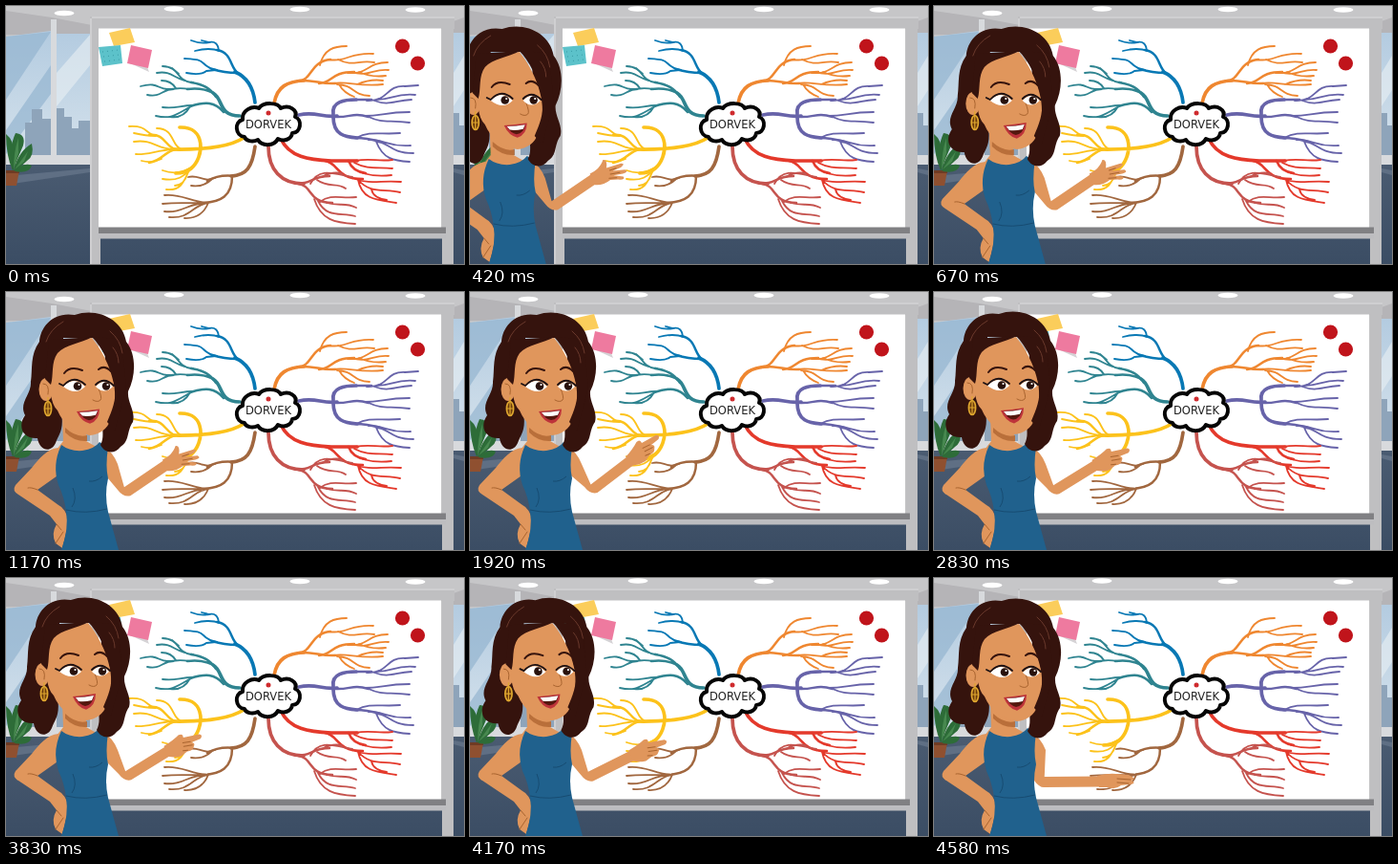
An HTML page that plays this animation: 480 px wide and 270 px high, repeating every 4660 ms.

```html
<!DOCTYPE html>
<html lang="en">
<head>
<meta charset="utf-8">
<title>Mind map presentation</title>
<style>
html, body { margin: 0; width: 100%; height: 100%; overflow: hidden; background: #c4c4c6; }
svg { display: block; width: 100vw; height: 100vh; }
.map path { fill: none; stroke-linecap: round; stroke-linejoin: round; stroke-width: 1.8; }
.map .trunk { stroke-width: 3.7; }
.map .limb { stroke-width: 2.5; }
.skin { fill: #e0965c; }
.hair { fill: #35130d; }
.line { fill: none; stroke: #a9642f; stroke-linecap: round; stroke-linejoin: round; }
</style>
</head>
<body>
<svg viewBox="0 0 480 270" preserveAspectRatio="none">
  <defs>
    <linearGradient id="sky" x1="0" y1="0" x2="0" y2="1">
      <stop offset="0" stop-color="#b3cbe0"/><stop offset="1" stop-color="#d5e2ec"/>
    </linearGradient>
    <linearGradient id="floor" x1="0" y1="0" x2="0" y2="1">
      <stop offset="0" stop-color="#4a5b71"/><stop offset="1" stop-color="#3b4d64"/>
    </linearGradient>
  </defs>

  <!-- Office -->
  <path fill="#c6c6c8" d="M0 0H480V270H0Z"/>
  <path fill="#b5b4b7" d="M0 5 48 12 90 20V30H0ZM469 16 480 12V30H469Z"/>
  <path fill="url(#sky)" d="M0 32 47 26V160H0ZM53 29H88V158H53ZM469 28H480V160H469Z"/>
  <path fill="#94b5d0" opacity=".7" d="M0 32 47 27 0 98ZM0 130 47 62V92L0 155Z"/>
  <path fill="#eaf0f4" opacity=".6" d="M53 70 88 30V62L53 105ZM469 70 480 52V88L469 105Z"/>
  <path fill="#8ea4ba" d="M20 160V122H27V108H38V118H47V160ZM53 158V107H61V116H69V128H76V120H88V158ZM469 160V112H475V125H480V160Z"/>
  <path fill="#d8dadd" d="M47 14H53V166H47ZM0 156H88V166H0ZM469 156H480V166H469Z"/>
  <path fill="url(#floor)" d="M0 166H88V270H0ZM97 238H460V270H97ZM469 166H480V270H469Z"/>
  <path fill="#5f6f84" d="M0 178 88 170V174L0 187ZM469 170 480 172V177L469 174Z"/>
  <g fill="#fff">
    <ellipse cx="61" cy="7.5" rx="10.500" ry="2.800"/><ellipse cx="176" cy="3" rx="10.500" ry="2.800"/>
    <ellipse cx="308" cy="3.500" rx="10.500" ry="2.800"/><ellipse cx="429" cy="4" rx="10.500" ry="2.800"/>
  </g>
  <path fill="#8f5030" d="M0 172H14L11 188H0Z"/>
  <path fill="#6f3b24" d="M0 172H14V175H0Z"/>
  <g fill="#2d6c38">
    <path d="M7 173Q2 150 10 133 21 134 18 146L12 160Z"/>
    <path d="M8 172Q13 152 27 144 30 157 22 162L10 173Z"/>
    <path d="M7 172Q0 157 0 134 8 140 9 155ZM9 173Q19 163 27 167 24 176 9 173Z"/>
    <path fill="#47884f" d="M8 171Q8 153 13 138L13 154ZM9 171 23 152 19 163Z"/>
  </g>

  <!-- Whiteboard -->
  <path fill="#bfbfc1" d="M90 11H470V24H90ZM88 11H99V270H88ZM457 11H469V270H457Z"/>
  <path fill="#cfcfd1" d="M90 11H470V13H90ZM88 13H90V270H88Z"/>
  <path fill="#fff" d="M97 23.500H456V232H97Z"/>
  <path fill="#808083" d="M97 231.500H461V238H97Z"/>
  <path fill="#bdbdc0" d="M97 238H461V243.500H97Z"/>
  <path fill="#fbcd5b" d="M108 28 130 23 135 38 113 42Z"/>
  <path fill="#5cc2ca" d="M97 43 120 41 122 60 101 63Z"/>
  <path fill="#d5d2d5" d="M128 59 148 64 150 69Z"/>
  <path fill="#ee7a9f" d="M131 41 153 46 149 65 127 60Z"/>
  <path fill="none" stroke="#389ba5" stroke-dasharray="1 4" d="M101 48 118 46M102 53 119 51M103 58 119 56"/>
  <g fill="#c0141b"><circle cx="415.500" cy="42" r="7.600"/><circle cx="431.500" cy="60" r="7.600"/></g>

  <g class="map">
    <g stroke="#0878b4">
      <path class="trunk" d="M261 101C259 84 252 74 240 69"/>
      <path class="limb" d="M244 71C234 65 238 49 221 46M242 70Q229 70 216 66"/>
      <path d="M194 36Q204 40 213 38T223 47M198 47Q213 43 224 47M205 36 213 38M187 55C200 56 203 56 207 60S214 66 221 67M189 70Q204 73 210 68L220 67"/>
    </g>
    <g stroke="#2f8490">
      <path class="trunk" d="M245 115C222 115 228 97 217 91"/>
      <path class="limb" d="M220 95C214 86 207 82 194 80M217 91Q206 85 190 87M228 111C219 100 209 100 193 105"/>
      <path d="M164 63C183 64 177 77 194 80M158 70C175 67 176 78 196 80M174 65 181 71M141 84C159 79 159 87 169 87S180 85 192 87M148 93C163 96 163 87 176 87M163 78Q173 78 178 86M164 106C178 108 182 104 196 104M157 115C175 119 178 113 196 104M172 116Q186 118 193 105"/>
    </g>
    <g stroke="#fcc21b">
      <path class="trunk" d="M249 138Q229 151 174 150M182 127C210 126 208 158 194 170Q188 175 178 175"/>
      <path class="limb" d="M150 135C167 133 167 148 178 150M150 164C164 162 166 152 178 150"/>
      <path d="M129 126C147 125 146 132 154 135M134 133Q147 136 157 136M158 128C177 128 173 147 184 150M134 142C154 139 158 150 176 150M136 155C149 156 157 151 176 150M142 162Q153 165 163 160M164 172C178 177 186 173 194 169M164 181C181 184 187 177 192 172M168 192C185 194 187 181 192 172M177 188Q187 187 190 176"/>
    </g>
    <g stroke="#a1673f">
      <path class="trunk" d="M261 147C258 169 252 177 236 178"/>
      <path class="limb" d="M240 178Q223 176 211 183M237 178C237 199 225 205 207 206"/>
      <path d="M191 179C203 176 205 185 219 180M194 188Q207 190 216 181M166 198C184 196 193 205 212 206M164 207C183 205 193 207 212 206M166 215C186 217 190 206 212 206M171 221C194 223 195 208 212 206M187 222Q205 223 212 206"/>
    </g>
    <g stroke="#ef8730">
      <path class="trunk" d="M281 102C284 84 295 79 312 78"/>
      <path class="limb" d="M305 79C322 78 318 58 340 56M308 78C324 77 329 82 345 81M328 81C343 80 340 69 365 69"/>
      <path d="M329 62C333 45 344 42 357 42M338 56C357 59 361 48 385 50M348 56C364 64 369 56 386 59M358 70C380 72 378 59 400 59M362 69C380 75 385 65 401 67M370 69Q383 75 398 73M343 81C357 78 370 85 395 82M347 82C366 83 362 93 381 94M349 82Q354 91 365 95M368 82Q382 76 395 78"/>
    </g>
    <g stroke="#6763a9">
      <path class="trunk" d="M307 114C325 110 330 117 347 115M343 113C341 100 355 98 367 98M343 116C343 135 355 137 368 138"/>
      <path class="limb" d="M367 98H383M344 116C362 117 362 111 380 116M366 138Q378 138 392 142"/>
      <path d="M378 99C402 100 397 83 418 84L432 83M388 98C405 98 408 91 429 93M386 99C402 105 406 99 425 98M376 115C394 115 397 111 423 111M380 116C395 123 400 119 423 122M367 138C382 130 393 135 413 133M380 140C397 139 400 148 424 146M388 142C401 142 402 154 427 154M388 142C395 160 406 162 423 163"/>
    </g>
    <g stroke="#e4392b">
      <path class="trunk" d="M288 139C297 158 317 161 341 162H368"/>
      <path class="limb" d="M334 162C349 164 345 181 374 181M359 162Q363 173 377 175"/>
      <path d="M366 162C382 159 390 163 405 161M365 164C380 172 390 168 405 170M374 175Q388 179 404 177M366 181C382 187 394 182 414 184M368 181C382 197 395 191 413 195M369 182C373 203 389 203 409 206M383 192Q385 201 399 203"/>
    </g>
    <g stroke="#c5534e">
      <path class="trunk" d="M275 147C275 171 288 186 312 186"/>
      <path class="limb" d="M302 185C320 188 319 178 339 178M306 186C322 188 316 206 342 206"/>
      <path d="M319 186C328 169 342 175 363 179M326 182C338 191 347 184 356 191M331 179Q341 173 352 175M329 205C341 196 351 202 367 200M336 206C350 210 355 205 367 211M327 204C336 222 350 216 366 220M323 202C330 224 345 227 366 228"/>
    </g>
  </g>

  <path fill="#fff" stroke="#050505" stroke-width="4" stroke-linejoin="round" d="M250 137C240 136 239 121 248 119 247 109 258 104 265 107 270 100 285 101 288 107 297 103 306 109 303 116 311 119 309 133 300 133 299 140 291 142 285 139 281 147 268 147 264 140 258 143 251 141 250 137Z"/>
  <circle cx="275" cy="112" r="2.500" fill="#cf2b2e"/>
  <text x="275" y="128" text-anchor="middle" font-family="'DejaVu Sans', sans-serif" font-size="11.500" fill="#222">DORVEK</text>

  <!-- Presenter -->
  <g id="woman">
    <path class="skin" d="M55 163C43 164 35 174 27 184L10 202Q6 208 13 212L46 234 53 243Q47 253 52 263L59 268 66 240Q62 226 55 223L33 207 57 190Z"/>
    <path class="line" d="M33 207Q26 204 23 205M53 243 58 249M52 263 60 251"/>
    <path class="skin" id="arm"/>
    <g id="hand">
      <path class="skin" id="palm"/>
      <path class="line" id="fingers"/>
    </g>
    <path class="skin" d="M59 130H84V156L98 164 86 175H67L53 165 60 156Z"/>
    <path fill="#b96f3a" d="M62 142Q74 153 85 150V156Q72 157 62 147Z"/>
    <path fill="#20618d" d="M58 160Q67 167 80 166 93 164 98 157L107 162Q104 183 107 195 103 212 107 230L118 270H58Q66 248 63 230 61 214 55 202 48 181 58 160Z"/>
    <path fill="none" stroke="#174c72" d="M63 228Q83 233 106 227M70 205Q75 217 69 225M101 193Q94 199 87 198"/>
    <g id="head">
      <path class="hair" d="M72 24C95 16 122 28 126 52 137 66 136 88 128 104 127 116 136 124 133 136 126 146 130 156 120 162 113 171 103 168 99 160 104 151 99 143 103 130L104 48 60 48 58 126C61 145 55 149 52 158 47 169 35 166 33 153 17 154 12 140 20 129 13 116 27 107 26 94 28 80 25 66 35 52 36 36 50 20 72 24Z"/>
      <ellipse class="skin" cx="42" cy="102" rx="7.500" ry="12"/>
      <path class="skin" d="M54 55C63 49 78 50 90 48 99 59 109 76 113 96 115 107 115 122 110 133 106 144 98 149 88 150 73 148 60 139 54 124 46 116 46 100 47 88 47 74 49 63 54 55Z"/>
      <path class="hair" d="M90 47C100 57 110 75 114 99 116 113 111 124 106 136L114 145 126 100 121 49ZM91 47C78 54 62 55 54 64 47 73 50 88 47 97L41 91 45 50Z"/>
      <path class="line" d="M39 96Q46 96 44 107M97 101Q101 111 99 113 96 116 91 113"/>
      <path fill="none" stroke="#35130d" stroke-width="2" stroke-linecap="round" d="M61 85Q67 77 80 82M97 81Q103 76 110 83"/>
      <path fill="#fff" d="M60 99Q71 87 83 99 73 109 60 99ZM94 99Q103 89 112 99 103 108 94 99Z"/>
      <g fill="#28110c"><circle cx="75" cy="98.500" r="4.300"/><circle cx="105" cy="98.500" r="4.200"/></g>
      <g fill="#fff"><circle cx="76.500" cy="97" r="1.100"/><circle cx="106.500" cy="97" r="1.100"/></g>
      <path fill="none" stroke="#1b1013" stroke-width="1.800" stroke-linecap="round" d="M56 96 60 98Q71 86 83 97M94 97Q103 88 113 98"/>
      <g id="mouth">
        <path fill="#bd333a" d="M74 125Q85 124 98 122 98 135 88 139 79 137 74 125Z"/>
        <path fill="#54180f" d="M77 126 96 124Q95 134 87 135 81 134 77 126Z"/>
        <path fill="#fff" d="M77 126Q87 126 96 124L94 129Q86 131 80 130Z"/>
      </g>
      <ellipse cx="44" cy="122" rx="3.600" ry="7.500" fill="#6b3a0c" stroke="#e0a82f" stroke-width="1.700"/>
      <path fill="none" stroke="#e0a82f" stroke-width="1.200" d="M44 110V129M41 122H47"/>
      <path fill="none" stroke="#6a392c" stroke-linecap="round" d="M60 31Q46 39 42 52M109 41Q120 50 122 64M112 58Q118 65 118 74"/>
    </g>
  </g>
</svg>
<script>
const LOOP = 4660, STEP = LOOP / 56;
const el = id => document.getElementById(id);
const mix = (a, b, u) => a + (b - a) * u;
const smooth = u => u * u * (3 - 2 * u);

const HANDS = {
  open: ['M-3-6C4-8 9-11 13-18Q18-18 15-9L31-11Q36-10 30-7L21-5 34-4Q38-1 31 0L21 0 31 3Q33 7 25 5L17 4Q8 9-1 6Z', 'M18-6 25-7M18-2 28-2M16 2 24 3'],
  point: ['M-3-6Q8-9 15-13 20-14 19-9L36-8Q40-6 36-3L26-2Q30 0 27 3 25 7 19 6L12 9Q5 9-1 6Z', 'M17-4 25-3M17 0 26 1M15 4 20 5'],
  flat: ['M-3-6Q9-9 17-8L30-7Q39-3 33-1 39 2 31 3L22 4Q16 9 8 6L-1 6Z', 'M18-3 32-2M18 1 30 2']
};

// time, elbow x y, wrist x y, hand angle, head x y, hand shape
const POSES = [
  [0, 128, 210, 168, 181, -10, 0, 0, 'open'],
  [1250, 128, 210, 168, 181, -10, 0, 0, 'open'],
  [1580, 131, 207, 169, 176, -33, -2, 0, 'point'],
  [2080, 131, 207, 169, 176, -33, -2, 0, 'point'],
  [2420, 129, 208, 170, 181, -16, -4, -1, 'point'],
  [4080, 129, 208, 170, 181, -16, -4, -1, 'point'],
  [4420, 116, 215, 174, 213, 0, -1, 0, 'flat'],
  [LOOP, 116, 215, 174, 213, 0, -1, 0, 'flat']
];

function poseAt(t) {
  const i = POSES.findIndex(p => p[0] > t);
  const a = POSES[i - 1], b = POSES[i];
  const u = smooth((t - a[0]) / (b[0] - a[0]));
  const values = a.slice(1, 8).map((v, k) => mix(v, b[k + 1], u));
  return [...values, u < .5 ? a[8] : b[8]];
}

function armPath(ex, ey, wx, wy) {
  const len = Math.hypot(wx - ex, wy - ey);
  const nx = (wy - ey) / len, ny = (ex - wx) / len;
  const at = (x, y, w) => `${x + nx * w} ${y + ny * w}`;
  return `M101 161Q112 167 117 180L${at(ex, ey, 7)}L${at(wx, wy, 5.5)}L${at(wx, wy, -5.5)}` +
    `L${at(ex, ey, -4)}Q${ex - 5} ${ey + 5} ${ex - 11} ${ey - 3}L101 188Z`;
}

function draw(now) {
  const t = Math.floor(now % LOOP / STEP) * STEP;
  const [ex, ey, wx, wy, angle, hx, hy, shape] = poseAt(t);
  const left = 1 - Math.min(1, t / 720);
  el('woman').setAttribute('transform', `translate(${-215 * left * left} 0)`);
  el('arm').setAttribute('d', armPath(ex, ey, wx, wy));
  el('hand').setAttribute('transform', `translate(${wx} ${wy}) rotate(${angle})`);
  el('palm').setAttribute('d', HANDS[shape][0]);
  el('fingers').setAttribute('d', HANDS[shape][1]);
  el('head').setAttribute('transform', `translate(${hx} ${hy})`);
  const open = .95 + .05 * Math.cos(t / 750 * 2 * Math.PI);
  el('mouth').setAttribute('transform', `translate(0 ${126 * (1 - open)}) scale(1 ${open})`);
}

const start = performance.now();
function tick() {
  draw(performance.now() - start);
  requestAnimationFrame(tick);
}
tick();
</script>
</body>
</html>
```
